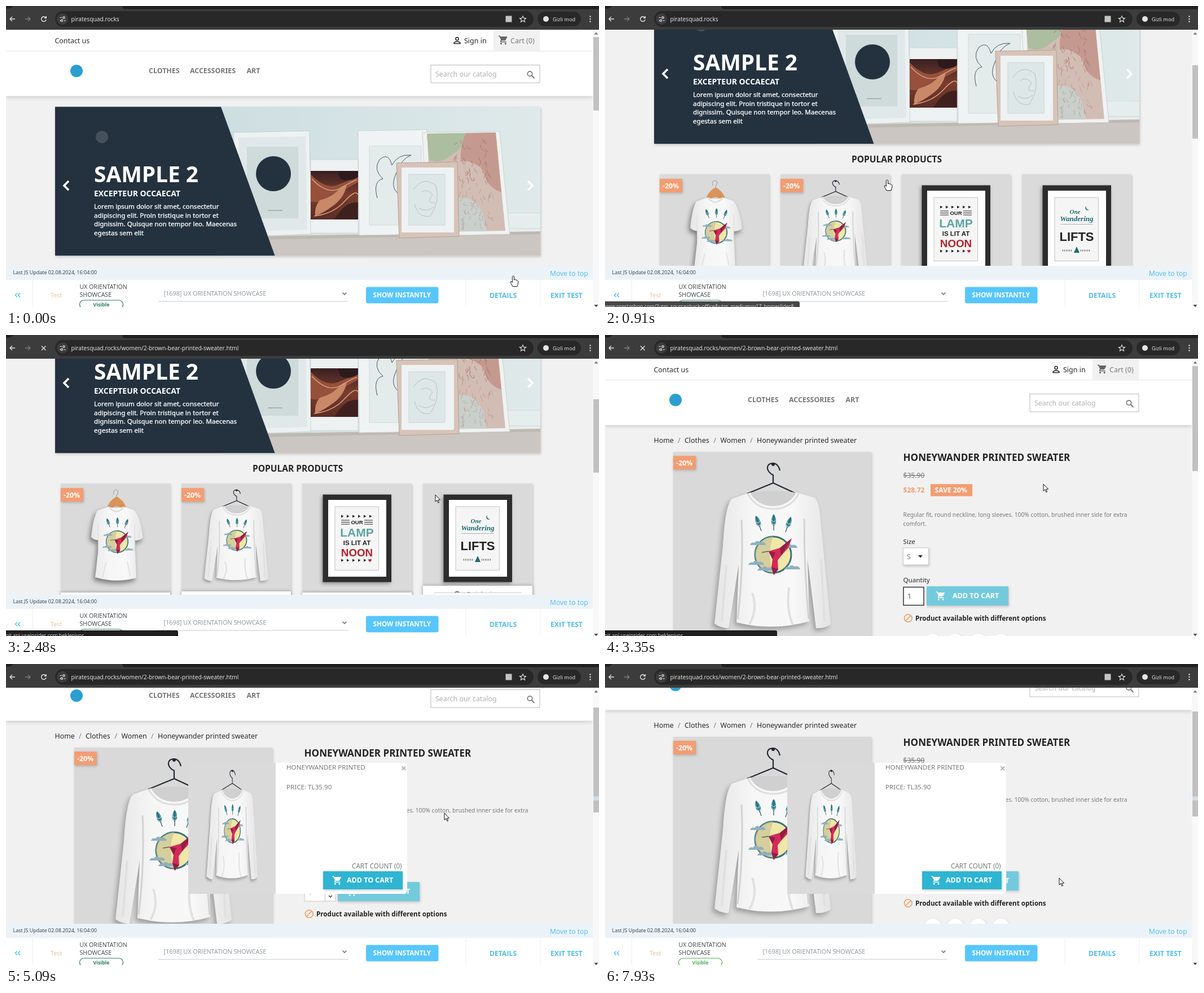
Recreate the animation shown at these times as an HTML page. Size 1051 by 533 pixels, loop 8000 ms.

```html
<!DOCTYPE html>
<html lang="en">
<head>
<meta charset="utf-8">
<title>Store walkthrough</title>
<style>
html, body { margin: 0; width: 100%; height: 100%; overflow: hidden; background: #f1f1f1; }
svg { display: block; }
text { font-family: "Noto Sans", "Open Sans", sans-serif; white-space: pre; }
.ui { font-family: "Open Sans", "Noto Sans", sans-serif; }
.b { font-weight: 700; }
.firm { stroke: #fff; stroke-width: .3px; }
.art { font-family: "Liberation Sans", Arial, sans-serif; font-weight: 700; }
.script { font-family: "Liberation Serif", serif; font-style: italic; font-weight: 700; }
.sh { filter: drop-shadow(1px 2px 2px rgba(0,0,0,.2)); }
</style>
</head>
<body>
<svg id="stage" width="1051" height="533" viewBox="0 0 1051 533"></svg>
<script>
const rect = (x, y, w, h, fill, more = '') =>
  `<rect x="${x}" y="${y}" width="${w}" height="${h}" fill="${fill}" ${more}/>`;
const text = (x, y, size, fill, str, cls = '', more = '') =>
  `<text x="${x}" y="${y}" font-size="${size}" fill="${fill}" class="${cls}" ${more}>${str}</text>`;
const line = (d, stroke, w = 1, more = '') =>
  `<path d="${d}" fill="none" stroke="${stroke}" stroke-width="${w}" ${more}/>`;
const fill = (d, color, more = '') => `<path d="${d}" fill="${color}" ${more}/>`;
const dot = (x, y, r, color, more = '') => `<circle cx="${x}" cy="${y}" r="${r}" fill="${color}" ${more}/>`;
const group = (id, body, more = '') => `<g id="${id}" ${more}>${body}</g>`;
const at = (x, y, body, scale = 1) => `<g transform="translate(${x} ${y}) scale(${scale})">${body}</g>`;
const shade = (id, stops, turn = '') => `<linearGradient id="${id}" ${turn}>` +
  stops.map((c, i) => `<stop offset="${i / (stops.length - 1)}" stop-color="${c}"/>`).join('') + '</linearGradient>';
const mid = 'text-anchor="middle"';

let seed = 7;
const rnd = (a, b) => {
  seed = (seed * 16807) % 2147483647;
  return Math.round((a + (b - a) * seed / 2147483647) * 10) / 10;
};

const cartPath = 'M7 18a2 2 0 100 4 2 2 0 000-4zM1 2v2h2l3.6 7.6-1.35 2.4C4.5 15.4 5.5 17 7 17h12v-2H7.4' +
  'c-.2 0-.3-.2-.2-.4l.9-1.6h7.45c.75 0 1.4-.4 1.75-1l3.6-6.5A1 1 0 0020 4H5.2l-.95-2H1zm16 16a2 2 0 100 4 2 2 0 000-4z';
const cart = (x, y, color, s = .75) => at(x, y, fill(cartPath, color), s);
const lens = (x, y, color) =>
  `<circle cx="${x - 1.5}" cy="${y - 1.5}" r="4.2" fill="none" stroke="${color}" stroke-width="1.7"/>` +
  line(`M${x + 1.5} ${y + 1.5}L${x + 6.5} ${y + 6.5}`, color, 2);

// Garments: the print is centred on its disc
const feather = (x, y, turn) => `<g transform="translate(${x} ${y}) rotate(${turn})">` +
  fill('M0-14Q5-8 4 3L0 7L-4 3Q-5-8 0-14Z', '#3d8d9c') + line('M0-12V15', '#1d4c5c', 1.2) +
  line('M-4-3L0 0L4-3M-4 2L0 5L4 2', '#bfe0e4', 1) + '</g>';
const cloud = (x, y) => fill(`M${x - 14} ${y + 3}q2-6 8-4q4-6 10-1q8-2 10 5z`, '#8fb0be');
const print = feather(-26, -56, -20) + feather(1, -58, 0) + feather(27, -54, 20) +
  dot(0, 0, 32, '#f1e7a6', 'stroke="#34747f" stroke-width="3"') +
  fill('M0-32A32 32 0 000 32Q-12 0 0-32Z', '#c9c39a', 'opacity=".7"') +
  cloud(-27, -20) + cloud(29, -15) + cloud(-30, 15) + cloud(34, 23) + cloud(-14, 25) +
  fill('M-8-6L12-12L33-29L27-12L14 2L8 10L9 26L1 36L-3 22L-1 8Z', '#d42a5b') +
  fill('M12-12L33-29L14 2ZM-8-6L4-4L-1 8ZM1 36L-3 22L9 26Z', '#8f1f45') +
  line('M-8-6L-20-4', '#333', 1.2);

const sweater =
  line('M189 33Q186 20 176 20Q166 21 167 30Q169 37 177 41V55L131 74M177 55L218 74', '#222833', 2.2) +
  dot(177, 22, 3, '#222833') +
  `<g style="filter:drop-shadow(-4px 5px 4px rgba(0,0,0,.28))">` +
  fill('M104 83L136 72Q177 84 218 72L250 81Q259 90 260 112L279 305Q270 313 253 312L238 190L241 300' +
    'Q178 318 112 302L116 200L98 312Q84 312 73 304L88 165Q92 94 104 83Z', 'url(#cloth)') + '</g>' +
  fill('M136 72Q177 66 218 72Q206 95 177 96Q148 95 136 72Z', '#d0d0d0') +
  line('M132 74Q146 101 177 101Q208 101 222 74', '#dedede', 3) +
  line('M121 120Q125 210 114 296M232 118Q232 210 240 296', '#d2d2d2', 3) +
  line('M140 250Q150 280 135 305M205 240Q200 280 212 306M94 200L86 300M262 190L268 300', '#e0e0e0', 4) +
  at(177, 182, print);

const tshirt =
  line('M94 20Q92 11 98 11Q105 13 99 21V25', '#aaa', 1.2) +
  fill('M82 43Q86 30 99 23Q112 30 116 43L110 45Q99 36 88 45Z', '#d99459') +
  `<g style="filter:drop-shadow(-3px 5px 4px rgba(0,0,0,.45))">` +
  fill('M85 41L65 48Q57 62 54 95Q60 101 67 100L66 122L61 166Q98 177 134 167L131 101' +
    'Q140 101 146 96Q141 58 130 47L112 41Q99 46 85 41Z', 'url(#cloth)') + '</g>' +
  line('M85 41Q99 58 112 41', '#dedede', 2.4) +
  line('M66 72L67 118M131 72L131 118M80 140L74 166M118 138L123 164', '#e0e0e0', 1.6) +
  at(100, 103, print, .6);

const frame = body =>
  `<g style="filter:drop-shadow(-2px 3px 3px rgba(0,0,0,.35))">${rect(36.5, 19.5, 121.5, 155, '#2d2d2d')}</g>` +
  rect(46, 29, 103, 136, '#fff') + rect(58, 41, 77.5, 112.5, '#f5f5f5', 'stroke="#c4c4c4"') + body;

const ticks = (y, n) => {
  let d = '';
  for (let i = 0; i < n; i++) d += `M${69 + i * 10} ${y - 2.5}l4.5 2.5l-4.5 2.5z`;
  return fill(d, '#222');
};
const poster1 = frame(ticks(58, 6) +
  line('M69 65H84M69 68.5H84M69 72H84M110 65H125M110 68.5H125M110 72H125', '#222', 1.2) +
  text(97, 72, 9.5, '#222', 'OUR', 'art', mid) +
  text(97, 93.5, 21, '#5ba5a1', 'LAMP', 'art', mid) +
  text(97, 108.5, 11.5, '#222', 'IS LIT AT', 'art', mid) +
  text(97, 128.5, 18.8, '#b9202c', 'NOON', 'art', mid) + ticks(136, 5) +
  fill('M120 139l-3.2-3.6q1.4-3 3.2-.6q1.8-2.4 3.2.6z', '#b9202c'));
const poster2 = frame(
  fill('M114 56a4.2 4.2 0 105 7a5 5 0 01-5-7z', '#1f6b70') +
  text(94, 70, 11, '#1f6b70', 'One', 'script', mid) +
  text(97, 83, 13, '#1f6b70', 'Wandering', 'script', mid) +
  line('M69 88.5H126', '#444', 1, 'stroke-dasharray="1 1.5"') +
  text(97, 118, 22, '#222', 'LIFTS', 'art', mid) +
  line('M72 135H90M104 135H122', '#444', 3, 'stroke-dasharray="1 2"') +
  fill('M97 128L102 139H92Z', '#1f6b70'));

const sale = (x, y) => `<g class="sh">${rect(x, y, 40, 24, '#f39d72')}</g>` +
  text(x + 5, y + 16.5, 12.3, '#fff', '-20%', 'b');

function card(i, art) {
  const x = 97 + 214 * i;
  const quick = rect(0, 193, 194, 60, '#fff', 'style="filter:drop-shadow(0 0 3px rgba(0,0,0,.3))"') +
    lens(62, 209, '#666') + text(76, 213, 12.4, '#7a7a7a', 'Quick view');
  return `<g class="sh" transform="translate(${x} 496)">${rect(0, 0, 194, 250, '#dadada')}</g>` +
    at(x, 496, art + group('quick' + i, quick) + rect(0, 194, 194, 56, '#fff') +
      group('rule' + i, line('M19.5 193.5H174.5', '#ccc'))) + (i < 2 ? sale(x, 504) : '');
}

const header = rect(0, 42, 1040, 117.5, '#fff', 'style="filter:drop-shadow(0 2px 3px rgba(0,0,0,.17))"') +
  rect(0, 79, 1040, 1.5, '#ececec') + rect(864, 42, 82.5, 37, '#f1f1f1') +
  text(86.5, 66, 12.4, '#2a2a2a', 'Contact us') +
  `<circle cx="799.5" cy="58" r="2.6" fill="none" stroke="#222" stroke-width="1.5"/>` +
  line('M794 66.5V65Q799.5 60.5 805 65V66.5Z', '#222', 1.5) +
  text(812, 66, 12.5, '#2a2a2a', 'Sign in') + cart(872, 51, '#666', .78) +
  text(894, 65.5, 12.6, '#7a7a7a', 'Cart (0)') +
  dot(125, 115, 11, '#2a9fd0') +
  text(253, 118.5, 12.4, '#777', 'CLOTHES', 'b') + text(326, 118.5, 12.4, '#777', 'ACCESSORIES', 'b') +
  text(426.5, 118.5, 12.4, '#777', 'ART', 'b') +
  rect(753, 104.5, 193, 31.5, '#fff', 'stroke="#b8b8b8"') +
  text(761, 125, 12.4, '#b0b0b0', 'Search our catalog') + lens(930, 121.5, '#777');

// Short wavy strokes give the map its contour texture
const contours = n => Array.from({ length: n }, () => {
  const y = rnd(236, 392), lean = (y - 222) * .1;
  const x = rnd(790, 852) + lean;
  return line(`M${x} ${y}q${rnd(-5, 5)} ${rnd(2, 6)} ${rnd(-6, 6)} ${rnd(4, 12)}`, '#a4665c', 1.2,
    `opacity="${y < 310 ? .5 : .28}"`);
}).join('');

const photo = rect(380, 178.5, 567, 264, 'url(#wall)') +
  rect(880, 364, 67, 40, '#e6eded') + line('M880 366H947M880 394H947', '#c9d5d6') +
  fill('M440 408L947 399V442H440Z', '#cbc6c1') + fill('M440 408L947 399V404L440 414Z', '#aaa49f', 'opacity=".4"') +
  fill('M403 224L538 221L541 404L410 409Z', '#edf1f1', 'stroke="#c3cfd0"') +
  fill('M412 233L531 231L534 396L418 399Z', '#e0e8e9') + rect(427, 249, 91, 127, '#cfdadb') +
  dot(474, 297, 31, '#24323f') + line('M464 362H490', '#9aa6a9', 1.5) +
  rect(540, 272, 84, 130, '#eef1f1', 'stroke="#cfd7d8"') + rect(540, 292, 84, 86, 'url(#rock)') +
  fill('M540 298Q566 326 590 316T624 300V312Q592 330 574 340T540 346Z', '#96503b') +
  fill('M556 344Q580 338 592 322L604 316Q600 338 582 352T548 372Q546 356 556 344Z', '#c98867') +
  line('M542 306Q570 336 594 322T622 308M546 372Q580 368 600 346T624 334', '#d9a284', 1.4) +
  fill('M588 292H624V303Q604 314 592 305Z', '#2e1a1d') + fill('M590 366Q606 346 624 348V378H582Z', '#40201f') +
  fill('M624 221L746 219L748 404L626 406Z', '#f0f3f3', 'stroke="#c9d3d4"') +
  rect(644, 248, 92, 140, '#e4ebeb', 'stroke="#d0d9d9"') +
  line('M658 340Q650 310 668 306Q650 290 662 272Q678 258 684 282Q694 262 718 264Q700 270 690 300Q680 325 700 335', '#4a5358', 1) +
  fill('M738 224L875 222L893 404L748 407Z', '#f0f2f1', 'stroke="#c9d2d2"') +
  fill('M746 226L868 224L885 398L756 400Z', '#d2bdb4') +
  fill('M746 226L815 225Q812 252 792 262Q770 282 750 272Z', '#adbda0') +
  fill('M815 225L868 224L878 330Q850 320 846 290Q820 270 806 276Q804 250 815 225Z', '#c49a90') +
  fill('M803 340Q830 336 846 368L852 399H803Z', '#c9cfca') + contours(80) +
  fill('M692 278L800 276L803 408L697 411Z', '#d7c3b8', 'stroke="#b3a297"') +
  rect(701, 286, 93, 115, '#eef2f2') + rect(714, 298, 64, 90, '#dde7e7', 'stroke="#ccd6d6"') +
  line('M722 325Q740 300 762 318Q770 345 752 372Q730 376 724 350M736 330Q746 322 756 334Q744 350 760 348M732 358Q746 366 758 356', '#b3bdbf', .9);

const lorem = ['Lorem ipsum dolor sit amet, consectetur', 'adipiscing elit. Proin tristique in tortor et',
  'dignissim. Quisque non tempor leo. Maecenas', 'egestas sem elit'];
const banner = `<g class="sh">${rect(87, 178.5, 860, 263.5, '#d6e3e5')}</g>` + photo +
  fill('M87 178.5H381L476.5 442H87Z', '#24323f') + dot(170, 232, 11, '#46505b') +
  text(156, 311.5, 38.8, '#fff', 'SAMPLE 2', 'b') + text(156, 336.5, 13.95, '#fff', 'EXCEPTEUR OCCAECAT', 'b') +
  lorem.map((s, i) => text(156, 359 + 15.5 * i, 11.64, '#fff', s, 'firm')).join('') +
  line('M111 310L103 318L111 326M925 310L933 318L925 326', '#fff', 3.6);

const home = header + banner + text(437, 475, 15.5, '#232323', 'POPULAR PRODUCTS', 'b') +
  [tshirt, at(0, 0, sweater, 194 / 351), poster1, poster2].map((a, i) => card(i, a)).join('');

const addBtn = (x, y, w, h, color, id, gap) =>
  `<g class="sh">${rect(x, y, w, h, color, `id="${id}"`)}</g>` + cart(x + 16, y + h / 2 - 9, '#fff', .76) +
  text(x + gap, y + h / 2 + 4, 12.45, '#fff', 'ADD TO CART', 'b');

const crumbs = [[86.5, 'Home'], [141, 'Clothes'], [204.5, 'Women'], [269, 'Honeywander printed sweater']];
const product = header +
  crumbs.map(c => text(c[0], 190.5, 12.42, '#2a2a2a', c[1])).join('') +
  [129, 192.5, 257].map(x => text(x, 190.5, 12.4, '#7a7a7a', '/')).join('') +
  group('photo', `<g class="sh">${rect(121, 207, 351, 351, '#d9d9d9')}</g>` + at(121, 207, sweater) + sale(121, 214)) +
  text(528.5, 222.5, 17.07, '#232323', 'HONEYWANDER PRINTED SWEATER', 'b') +
  text(528.5, 253, 12.1, '#7a7a7a', '$35.90', '', 'text-decoration="line-through"') +
  text(528.5, 278.5, 12.1, '#f39d72', '$28.72', 'b') + rect(577, 264, 74, 21.5, '#f39d72') +
  text(584.5, 279, 12.2, '#fff', 'SAVE 20%', 'b') +
  text(528.5, 321.5, 10.28, '#7a7a7a', 'Regular fit, round neckline, long sleeves. 100% cotton, brushed inner side for extra') +
  text(528.5, 337.5, 10.28, '#7a7a7a', 'comfort.') + text(528.5, 369.5, 11.64, '#2a2a2a', 'Size') +
  `<g class="sh">${rect(528.5, 377, 45, 30, '#fff', 'stroke="#bbb" stroke-width=".7"')}</g>` +
  text(535, 396.5, 12.4, '#7a7a7a', 'S') + fill('M555 390H563L559 394.5Z', '#222') +
  text(528.5, 438, 11.64, '#2a2a2a', 'Quantity') +
  group('plain', rect(529, 446.5, 36, 32, '#fff', 'stroke="#3c3c3c" stroke-width="1.6"') + addBtn(570, 445, 145, 34, '#74cadd', 'a1', 46)) +
  group('spin', rect(529, 446, 55, 33, '#fff', 'stroke="#c4c4c4"') + line('M565.5 446V479M565.5 462.5H584', '#c4c4c4') +
    line('M572 456L575 453L578 456M572 469L575 472L578 469', '#333', 1.3) + addBtn(588, 445, 145, 34, '#74cadd', 'a2', 46)) +
  text(536, 467, 12.4, '#555', '1') +
  `<circle cx="537.3" cy="501.5" r="6.8" fill="none" stroke="#ee9a5c" stroke-width="1.6"/>` +
  line('M532.5 506.3L542.1 496.7', '#ee9a5c', 1.6) +
  text(550, 505.5, 11.63, '#232323', 'Product available with different options', 'b') +
  [581, 621, 661.5, 702].map(x => dot(x, 544, 15, '#fff', 'class="sh"')).join('');

const popup = rect(470, 175, 241, 232, '#fff', 'rx="6"') + rect(323, 175, 155, 232, '#dadada') +
  `<g transform="translate(323 175) scale(${155 / 351} ${232 / 351})">${sweater}</g>` +
  text(497, 187, 11.62, '#777', 'HONEYWANDER PRINTED') + text(497, 222, 11.62, '#777', 'PRICE: TL35.90') +
  line('M701.5 181.5L708 188M708 181.5L701.5 188', '#b3b3b3', 1.8) +
  text(613, 361.5, 11.7, '#777', 'CART COUNT (0)') + addBtn(562, 367, 141, 32, '#2fb5d2', 'buy', 42);

const blue = '#52bdec';
const bar = rect(0, 460, 1040, 25, '#ebf3f9') + rect(0, 485, 1040, 48, '#fff') +
  line('M47.5 485V533M815 485V533M947 485V533', '#ededed') +
  text(12.5, 475, 9, '#2d3a45', 'Last JS Update 02.08.2024, 16:04:00', 'ui') +
  text(964, 478, 12.1, blue, 'Move to top', 'ui') +
  line('M20 508.5L16.5 512L20 515.5M25 508.5L21.5 512L25 515.5', blue, 1.5) +
  text(79, 516, 10.8, '#e0bd94', 'Test', 'ui') +
  text(130.5, 500.5, 10.6, '#3a4148', 'UX ORIENTATION', 'ui') + text(130.5, 514.5, 10.6, '#3a4148', 'SHOWCASE', 'ui') +
  group('badge', `<rect x="130.5" y="521" width="77" height="15" rx="7.5" fill="#fff" stroke="currentColor" stroke-width="1.2"/>` +
    text(169, 531.5, 8.8, 'currentColor', 'Visible', 'ui b', mid)) +
  text(279.5, 513, 10.85, '#8b9399', '[1698] UX ORIENTATION SHOWCASE', 'ui') +
  line('M270 523H607', '#c4c9cc') + line('M596.5 507.5L600 511L603.5 507.5', '#777', 1.7) +
  rect(638, 497.5, 128.5, 29, '#57c6fb', 'rx="3"') + text(650.5, 516, 11.7, '#fff', 'SHOW INSTANTLY', 'ui b') +
  text(857, 516.5, 12.2, blue, 'DETAILS', 'ui b') + text(965, 516.5, 12.2, blue, 'EXIT TEST', 'ui b');

const status = (id, w, x, color, str) => group(id,
  `<path d="M0 523H${w - 3}q3 0 3 3V533H0Z" fill="${color}"/>` + text(x, 534.5, 9, '#dcdcdc', str, 'ui'));

const scroller = rect(1040, 42, 11, 491, '#f8f8f8') + fill('M1042.5 50.5H1049.5L1046 46.5Z', '#777') +
  fill('M1042.5 529H1049.5L1046 533Z', '#444') + rect(1041, 55, 10, 130, '#c1c1c1', 'id="thumb"') +
  group('mark', rect(1041, 234.5, 10, 7, '#d3dfe8'));

const pale = '#e4e4e4';
const chrome = rect(0, 0, 1051, 42, '#3c3c3c') + fill('M200 0H1051V5.5H212Q206 5.5 206 0Z', '#202020') +
  fill('M0 0H13Q10 5 0 5Z', '#202020') + rect(87, 9, 848, 28, '#282828', 'rx="14"') +
  rect(942, 10, 77, 26, '#282828', 'rx="13"') +
  line('M16 23H7.5M11 19L7 23L11 27', pale, 1.3) + line('M34 23H42.5M39 19L43 23L39 27', '#7d7d7d', 1.3) +
  group('reload', line('M70.2 20.2A4.3 4.3 0 1071.2 24M71.3 18V21.3H68', pale, 1.4)) +
  group('stop', line('M63 19.5L70.5 27M70.5 19.5L63 27', pale, 1.4)) +
  dot(100, 23, 10, '#3c3c3c') + line('M95.5 20.5H99M103 25.8H105.5M95.5 25.8H97', pale, 1.2) +
  `<circle cx="102.5" cy="20.5" r="1.7" fill="none" stroke="${pale}" stroke-width="1.2"/>` +
  `<circle cx="99" cy="25.8" r="1.7" fill="none" stroke="${pale}" stroke-width="1.2"/>` +
  text(115.5, 27, 10.22, '#ececec', '', 'ui', 'id="url"') +
  group('translate', rect(885.5, 17.5, 11, 11, '#c4c4c4')) +
  line('M916 17.6L917.6 21.4L921.6 21.7L918.5 24.3L919.5 28.2L916 26L912.5 28.2L913.5 24.3L910.4 21.7L914.4 21.4Z', pale, 1.1) +
  dot(957, 23, 5, pale) + text(969, 26.5, 9.2, '#ececec', 'Gizli mod', 'ui') +
  [18.5, 23, 27.5].map(y => dot(1035.5, y, 1.2, pale)).join('');

const hand = 'M-1.6 1Q0-1.6 1.6 1V7L3 6.2L4.6 7.4L6 7L7.4 8.4Q9 8 9 11L8 15.5L7 18.8H-1L-3.2 14.5L-5 11Q-4.4 9-2.6 10.2L-1.6 11.4Z';
const arrow = 'M0 0V12.2L2.8 9.6L4.7 14.2L6.6 13.4L4.7 9H8.6Z';

const defs = shade('wall', ['#cddee1', '#d6e4e6', '#dfe9ea']) +
  shade('cloth', ['#e6e6e6', '#f6f6f6', '#f8f8f8', '#e4e4e4']) +
  shade('rock', ['#3a2022', '#7a3d2d', '#5a2c26'], 'x2="0" y2="1"');

document.getElementById('stage').innerHTML =
  `<defs>${defs}</defs>` + rect(0, 0, 1051, 533, '#f1f1f1') +
  group('home', home) + group('product', product) + group('bar', bar) + group('popup', popup) + scroller + chrome +
  status('slide', 345, -3, '#474747', 'www.prestashop.com/?utm_source=back-office&amp;utm_medium=v17_homeslider&amp;') +
  status('link', 289, -5, '#262626', 'https://piratesquad.rocks/women/2-brown-bear-printed-sweater.html') +
  status('wait', 305, -1, '#1f1f1f', 'nit.api.useinsider.com bekleniyor') +
  `<path id="cursor" stroke="#111" stroke-width="1" fill="#fff" stroke-linejoin="round"/>`;

// Screen updates: first, last, count
const runs = [[0], [70], [230, 980, 12], [1050], [1240, 1510, 5], [1770, 2480, 11], [2610], [2880, 3350, 6],
  [3610, 3680, 2], [3940, 4080, 3], [4420, 4550, 2], [4750], [5030, 5160, 3], [5480, 6270, 12], [6340, 7100, 12], [7170, 7930, 12]];
const steps = runs.flatMap(([a, b, n = 1]) =>
  Array.from({ length: n }, (_, k) => n > 1 ? Math.floor((a + (b - a) * k / (n - 1)) / 10) * 10 : a));

const homeScroll = [[540, 0], [700, 94], [840, 170], [980, 226], [1050, 233]];
const productScroll = [[4970, 0], [5030, 28], [5090, 59], [5160, 78]];
const raise = [null, [[1170, 0], [1370, 27], [2190, 27], [2480, 2]], [[2130, 0], [2270, 9], [2400, 0]], [[2300, 0], [2480, 12]]];
const path = [[0, 899, 478], [69, 899, 478], [70, 585, 342], [160, 585, 342], [500, 500, 308], [1170, 500, 308],
  [1370, 424, 339], [1900, 424, 339], [2200, 520, 330], [2480, 761, 283], [2820, 761, 283], [3350, 777, 264],
  [5410, 777, 264], [5620, 791, 282], [6000, 706, 340], [6270, 652, 374], [6600, 632, 380], [7100, 660, 383],
  [7240, 722, 398], [7500, 825, 409], [7700, 820, 392], [7930, 805, 379]];

function lerp(table, t, col = 1) {
  if (t <= table[0][0]) return table[0][col];
  const i = table.findIndex(k => k[0] > t);
  if (i < 0) return table[table.length - 1][col];
  const a = table[i - 1], b = table[i];
  return a[col] + (b[col] - a[col]) * (t - a[0]) / (b[0] - a[0]);
}

const el = id => document.getElementById(id);
const set = (id, name, value) => el(id).setAttribute(name, value);
const show = (id, v) => set(id, 'opacity', +v);
const within = (t, a, b) => t >= a && t < b;

function draw(now) {
  const real = now % 8000;
  let t = 0;
  for (const s of steps) if (s <= real) t = s;
  const onHome = t < 2610, loading = within(t, 1770, 3610);
  const y = Math.round(lerp(onHome ? homeScroll : productScroll, t));

  el('home').style.display = onHome ? '' : 'none';
  el('product').style.display = onHome ? 'none' : '';
  set(onHome ? 'home' : 'product', 'transform', `translate(0 ${-y})`);
  for (let i = 0; i < 4; i++) {
    const up = raise[i] ? lerp(raise[i], t) : 0;
    set('quick' + i, 'transform', `translate(0 ${-up})`);
    show('rule' + i, up > 6);
  }
  set('thumb', 'y', 55 + y * (onHome ? .252 : .372));
  set('thumb', 'height', onHome ? 130 : 186);

  show('photo', t >= 2880);
  show('plain', t < 3610);
  show('spin', t >= 3610);
  show('bar', onHome || t >= 4750);
  show('popup', lerp([[4350, 0], [4420, .5], [4550, 1]], t));
  show('mark', t >= 4420);
  const g = lerp([[5410, 0], [7100, 1]], t);
  el('badge').style.color = `rgb(${43 + 33 * g},${122 + 53 * g},${92 - 12 * g})`;

  show('reload', !loading);
  show('stop', loading);
  show('translate', t < 1770 || t >= 3680);
  const url = 'piratesquad.rocks' + (t < 1770 ? '' : '/women/2-brown-bear-printed-sweater.html');
  if (el('url').textContent !== url) el('url').textContent = url;
  show('slide', within(t, 290, 1240));
  show('link', within(t, 1240, 1840));
  show('wait', t < 1840 ? 0 : lerp([[3870, 1], [4080, 0]], t));

  const x = lerp(path, t), cy = lerp(path, t, 2);
  const over = x > 562 && x < 703 && cy > 367 && t > 6200;
  set('buy', 'fill', over ? '#2592a9' : '#2fb5d2');
  set('cursor', 'd', over || t < 2190 ? hand : arrow);
  set('cursor', 'transform', `translate(${x} ${cy})`);
}

let start = null;
function tick(now) {
  if (start === null) start = now;
  draw(now - start);
  requestAnimationFrame(tick);
}
draw(0);
requestAnimationFrame(tick);
</script>
</body>
</html>
```
